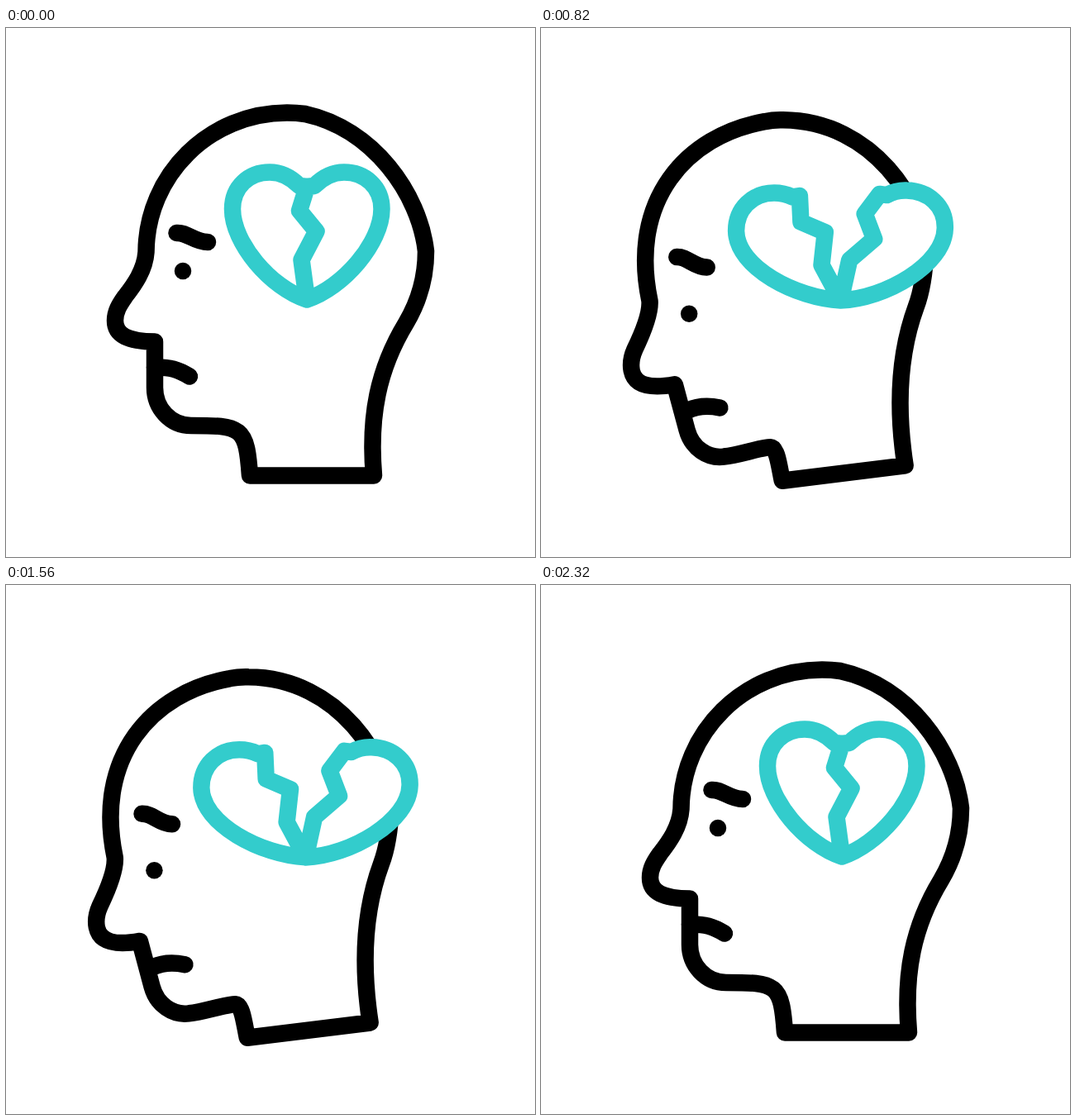
Recreate the animation shown at these times as an HTML page without scripts. Size 640 by 640 pixels, loop 2400 ms.

```html
<!DOCTYPE html>
<html lang="en">
<head>
<meta charset="utf-8">
<title>Heartbreak on the mind</title>
<style>
  html, body { margin: 0; width: 100%; height: 100%; overflow: hidden; background: #fff; }
  svg { display: block; width: 100%; height: 100%; }

  path {
    d: var(--upright);
    fill: none; stroke: #000; stroke-width: 20.5;
    stroke-linecap: round; stroke-linejoin: round;
    animation: nod 2.4s infinite;
  }

  /* Each way is one strong ease-in-out, split at the halfway pose */
  @keyframes nod {
    0%, 96.67%, 100% { d: var(--upright); animation-timing-function: cubic-bezier(.73, 0, .865, .5); }
    25%, 73.33% { d: var(--halfway); animation-timing-function: cubic-bezier(.135, .5, .27, 1); }
    50% { d: var(--bowed); animation-timing-function: cubic-bezier(.73, 0, .865, .5); }
  }

  .head {
    --upright: path("M180 379.5L180 435C180 460 199 481 224 481C255 481 270 481 281 489C291 497 293 514 295 541.5L445 541.5C439 470 450 413 484 357C500 330 508 302 508 270C500 200 444 122 362 104C355 103 347 102.5 340 102.5C246 102.5 170 178 169.5 271C168 293 155 311 144 325C137 335 132 343 132 354C132 372 148 379 180 379.5Z");
    --halfway: path("M168.5 408L177 465C181 488 199 503 219 502C240 501 270 496 279 499C288 503 290 525 293 545L443 534.5C436 473 437 410 468 345C478 323 483 300 482.5 268C479 212 424 115 326 107C318 106 310 106 303 106.5C215 112 132 185 146.5 304C147 322 136 343 126 359C119 371 117 379 118 387C120 406 140 411 168.5 408Z");
    --bowed: path("M160 437.5L176.5 492C183 514 203 526 222 523C239 521 267 510 277 509.5C285 509 287 528 291.5 548.5L440 528C431 474 428 400 450 335C456 318 459 300 461 268C457 215 400 112 284 112.5C278 112.5 270 113 262 115C165 135 99 215 127.5 337C129 352 119 377 110 397C106 407 106 415 107.5 422C112 441 132 443 160 437.5Z");
  }
  .brow {
    --upright: path("M206.5 248C219 247 228 259 244 259");
    --halfway: path("M182 264C195 264 203 275 218.5 275");
    --bowed: path("M159.5 280.5C173 280 180 293 196 293.5");
  }
  .eye {
    --upright: path("M214 294h.01");
    --halfway: path("M193 322h.01");
    --bowed: path("M175.5 352h.01");
  }
  .mouth {
    --upright: path("M180 410.5C198 410 208 413 222 421.5");
    --halfway: path("M180 439C194 436 204 438 218 442.5");
    --bowed: path("M177 469C190 462 204 462 216 464");
  }
  .heart {
    fill: #fff; stroke: #3cc;
    --upright: path("M364 328.5C320 314 274 260 274 219C274 192 294 174.5 319 174.5C335 174.5 346 182 355 191L364 192L355 221L375.5 246L357.5 280.5L364 328.5ZM364 328.5C408 314 454.5 260 454.5 219C454.5 192 434 174.5 409 174.5C393 174.5 382 182 373 191L364 192L355 221L375.5 246L357.5 280.5L364 328.5Z");
    --halfway: path("M364 329C325 322 252 275 251.5 233C251 205 272 186.5 297 186.5C312 186.5 320 190 328 195L335 196L331 226L358 244.5L347 283L364 329ZM364 329C404 322 474 272 475 232C476 204 455 186 429 185.5C415 185.5 405 190 397 195L390 195L375.5 220.5L392.5 249.5L366.5 280L364 329Z");
    --bowed: path("M362 329.5C305 328 233 294 232 249C232 222 252 203 278 203C288 203 293 205 298 207L307 205L310 237L340 248L337.5 288L362 329.5ZM362 329.5C420 329 492 290 492.5 245C493 218 472 200 446 199.5C438 199 432 200 424 204L415 202.5L396 226L406 256.5L375 281L362 329.5Z");
  }
</style>
</head>
<body>
<svg viewBox="0 0 640 640" role="img" aria-label="Bowing head with a breaking heart">
  <path class="head"/>
  <path class="brow"/>
  <path class="eye"/>
  <path class="mouth"/>
  <path class="heart"/>
</svg>
</body>
</html>
```
